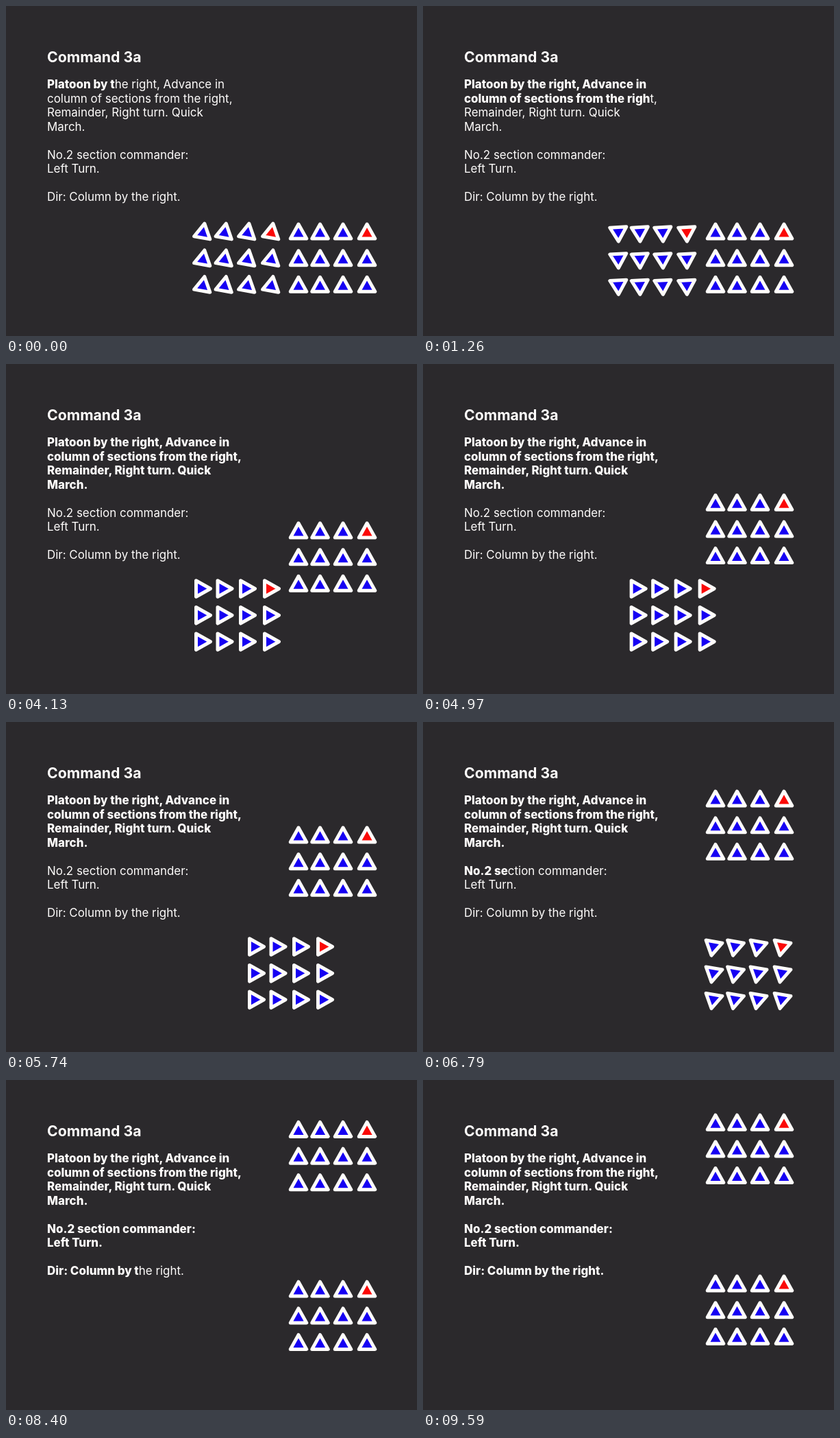
Animation of 600x481 px, one loop 9.66 s. Source, as an HTML page:

```html
<!DOCTYPE html>
<html lang="en">
<head>
<meta charset="utf-8">
<title>Command 3a</title>
<style>
  html, body { margin: 0; width: 100%; height: 100%; overflow: hidden; background: #2b292c; }
  svg { display: block; width: 600px; height: 481px; }
  text { font: 400 16.94px Inter, sans-serif; font-optical-sizing: none; fill: #fffdfc; white-space: pre; }
  .title { font-size: 21.25px; font-weight: 700; }
  .bold { font-weight: 800; }
  path { stroke: #fffdfb; stroke-width: 5; stroke-linejoin: round; }
</style>
</head>
<body>
<svg id="stage" viewBox="0 0 600 481">
  <text class="title" x="60" y="81.6">Command 3a</text>
</svg>
<script>
const LOOP = 9660, STEP = 70;
const COLUMNS = [0, 31.5, 65, 100], ROWS = [0, 38.8, 77.3];
const LINE_HEIGHT = 20.5, FIRST_BASELINE = 120.3;

// Keyframes: [time, value] pairs, linear in between
const typing = [
  { first: 0, lines: ['Platoon by the right, Advance in', 'column of sections from the right,',
      'Remainder, Right turn. Quick', 'March.'], keys: [[140, 0.12], [2025, 1]] },
  { first: 5, lines: ['No.2 section commander:', 'Left Turn.'], keys: [[6655, 0], [7280, 1]] },
  { first: 8, lines: ['Dir: Column by the right.'], keys: [[7280, 0], [9030, 1]] }
];
const leadY = [[2025, 328.5], [2450, 311.5], [4130, 242.5], [5740, 164.5],
  [6655, 117.5], [7280, 90], [9030, 61.7]];
const rearX = [[4570, 288], [6655, 427]];
const rearY = [[6655, 327.5], [7280, 319], [9030, 296.5]];
const rearHeading = [[140, 10], [2025, 90], [6655, 90], [7280, 0]];

const stage = document.getElementById('stage');

function add(parent, tag, attrs = {}) {
  const node = document.createElementNS('http://www.w3.org/2000/svg', tag);
  for (const name in attrs) node.setAttribute(name, attrs[name]);
  return parent.appendChild(node);
}

function valueAt(keys, t) {
  if (t <= keys[0][0]) return keys[0][1];
  for (let i = 1; i < keys.length; i++) {
    const [t0, a] = keys[i - 1], [t1, b] = keys[i];
    if (t < t1) return a + (b - a) * (t - t0) / (t1 - t0);
  }
  return keys[keys.length - 1][1];
}

function makeSection() {
  return ROWS.flatMap((dy, row) => COLUMNS.map((dx, col) => ({
    dx, dy,
    node: add(stage, 'path', {
      d: 'M0-10.5L11.75 10.5H-11.75Z',
      fill: row === 0 && col === 3 ? '#fb0907' : '#1600f3'
    })
  })));
}

function placeSection(section, x, y, heading) {
  for (const { dx, dy, node } of section)
    node.setAttribute('transform', `translate(${x + dx} ${y + dy}) rotate(${heading})`);
}

for (const block of typing) {
  block.length = block.lines.join('').length;
  block.rows = block.lines.map((line, i) => {
    const text = add(stage, 'text', { x: 60, y: FIRST_BASELINE + (block.first + i) * LINE_HEIGHT });
    return { line, bold: add(text, 'tspan', { class: 'bold' }), plain: add(text, 'tspan') };
  });
}

function typeBlock(block, t) {
  let left = Math.round(valueAt(block.keys, t) * block.length);
  for (const { line, bold, plain } of block.rows) {
    const count = Math.max(0, Math.min(left, line.length));
    bold.textContent = line.slice(0, count);
    plain.textContent = line.slice(count);
    left -= line.length;
  }
}

const rear = makeSection(), lead = makeSection();

function draw(now) {
  const t = Math.floor((now % LOOP) / STEP) * STEP;
  typing.forEach(block => typeBlock(block, t));
  placeSection(lead, 427, valueAt(leadY, t), 0);
  placeSection(rear, valueAt(rearX, t), valueAt(rearY, t), valueAt(rearHeading, t));
}

const start = performance.now();
function tick() {
  draw(performance.now() - start);
  requestAnimationFrame(tick);
}
tick();
</script>
</body>
</html>
```
